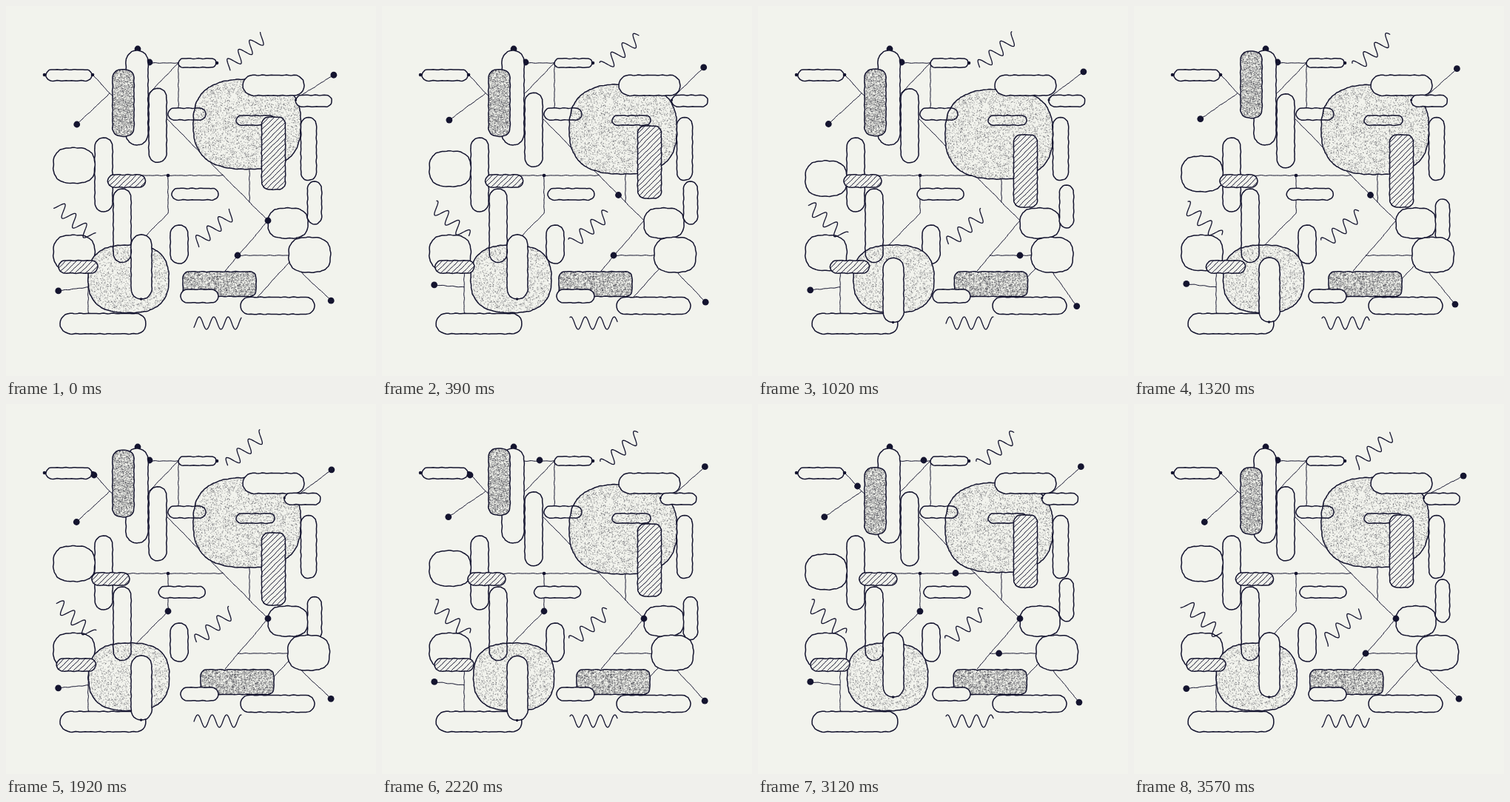
These frames come from a looping animation (500x500 px, 3.6 s). An HTML page with a canvas:

```html
<!DOCTYPE html>
<html lang="en">
<head>
<meta charset="utf-8">
<title>Moving shapes</title>
<style>
html, body { margin: 0; height: 100%; overflow: hidden; background: #f2f3ed; }
canvas { display: block; width: 500px; height: 500px; }
</style>
</head>
<body>
<canvas id="stage" width="500" height="500"></canvas>
<script>
const g = document.getElementById('stage').getContext('2d');
const ink = '#14142f', paper = '#f2f3ed', speck = '#1c1c28';
const { sin, cos, sign, abs, min, max, hypot, PI } = Math;
const TAU = 2 * PI;
let s = -1; // current step, 48 per loop

// ---- motion ----
function ease(u, back) {
  u = min(1, max(0, u));
  const f = v => v * v * ((back + 1) * v - back) / 2;
  return u < .5 ? f(2 * u) : 1 - f(2 - 2 * u);
}
// goes from 0 to 1 starting at step a, returns starting at step b
const slide = (a, b, d = 8, back = 2.6) => ease((s - a) / d, back) - ease((s - b) / d, back);
const glide = (a, b, d = 8) => slide(a, b, d, 0);
const swing = (shift = 0) => cos(TAU * (s - shift) / 12);
function bump(peak) {
  const t = s % 24;
  return (1 - cos(PI * (t < peak ? t / peak : (24 - t) / (24 - peak)))) / 2;
}

// ---- drawing ----
function rough(pts, closed) {
  const path = new Path2D();
  pts.forEach(([x, y], i) => {
    const [X, Y] = pts[i + 1] || (closed ? pts[0] : pts[i]);
    const n = max(1, Math.round(hypot(X - x, Y - y) / 2.5));
    for (let k = 0; k < n; k++) {
      const a = x + (X - x) * k / n, b = y + (Y - y) * k / n;
      path.lineTo(
        a + .25 * sin(.9 * a + .61 * b) + .2 * sin(.37 * b - .23 * a),
        b + .25 * sin(.57 * a - .8 * b + 2) + .2 * sin(.41 * a + .29 * b));
    }
  });
  if (closed) path.closePath();
  return path;
}

function line(...pts) {
  g.lineWidth = 1;
  g.stroke(rough(pts));
}

function dot(x, y, r = 4.4) {
  g.beginPath();
  g.arc(x, y, r, 0, TAU);
  g.fillStyle = ink;
  g.fill();
}

function roundedPoints(w, h, r) {
  const pts = [];
  for (let k = 0; k < 4; k++)
    for (let j = 0; j < 7; j++) {
      const a = (k * 6 + j) * PI / 12;
      pts.push([(k % 3 ? r : w - r) + r * cos(a), (k < 2 ? h - r : r) + r * sin(a)]);
    }
  return pts;
}

function blobPoints(w, h, n) {
  const bend = v => sign(v) * abs(v) ** (2 / n);
  return Array.from({ length: 72 }, (_, i) => {
    const a = i * TAU / 72;
    return [w / 2 * (1 + bend(cos(a))), h / 2 * (1 + bend(sin(a)))];
  });
}

// random specks, thinning out to the left of the share "from"
function grain(w, h, density, from) {
  let seed = Math.round(w * 3100 + h * 17);
  const rnd = () => (seed = seed * 16807 % 2147483647) / 2147483647;
  g.fillStyle = speck;
  for (let i = w * h * density; i > 0; i--) {
    const x = rnd(), y = rnd();
    g.globalAlpha = .2 + .35 * rnd();
    if (!from || x > from + (1 - from) * rnd()) g.fillRect(x * w, y * h, 1, 1);
  }
  g.globalAlpha = 1;
}

function hatch(w, h) {
  g.lineWidth = 1;
  for (let c = 3; c < w + h; c += 7.2) line([c, 0], [c - h, h]);
}

function shape(x, y, w, h, o = {}) {
  const path = rough(o.n ? blobPoints(w, h, o.n) : roundedPoints(w, h, o.r || min(w, h) / 2), true);
  g.save();
  g.translate(x, y);
  if (!o.open) {
    g.fillStyle = paper;
    g.fill(path);
  }
  g.save();
  g.clip(path);
  if (o.grain) grain(w, h, o.grain, o.from);
  if (o.hatch) hatch(w, h);
  g.restore();
  g.lineWidth = 1.5;
  g.stroke(path);
  g.restore();
}

function wave(x, y, angle) {
  const crest = 4.2 * swing(9.8) - 26.5;
  g.save();
  g.translate(x, y);
  g.rotate(angle * PI / 180);
  g.lineWidth = 1.3;
  g.beginPath();
  for (let i = -32; i <= 32; i++) g.lineTo(i, -8.5 * cos(TAU * (i - crest) / 19.5));
  g.stroke();
  g.restore();
}

// a dot on an arm around a pivot
function arm(x, y, length, angle) {
  const a = angle * PI / 180;
  const X = x + length * cos(a), Y = y + length * sin(a);
  line([x, y], [X, Y]);
  dot(X, Y);
}

function drawLines() {
  line([117, 93], [150, 128]);
  line([192, 77], [233, 77], [233, 138]);
  line([233, 77], [190, 121]);
  line([218, 153], [354, 290], [296, 358]);
  line([329, 200], [329, 265]);
  line([140, 229], [293, 229]);
  line([219, 229], [219, 280], [166, 334]);
  line([313, 337], [390, 337]);
  line([396, 332], [340, 393]);
  line([111, 350], [111, 415]);
  arm(140, 118, 61, 180 - 38.7 - 4.8 * swing());
  arm(392, 125, 60, -35 + 9.8 * swing(9.6));
  arm(111, 380, 40.5, 180 - 7 * swing(-.3));
  arm(396, 357, 59.7, 43.6 + 11 * bump(12));
}

function drawDots() {
  [[52, 93], [117, 93], [285, 77], [219, 229]].forEach(p => dot(...p, 2.3));
  dot(178, 58);
  dot(194 + 38 * glide(25, 38), 76);
  const b = glide(16, 37);
  dot(150 - 31 * b, 126 - 30 * b);
  const c = glide(0, 13);
  dot(354 - 69 * c, 290 - 69 * c);
  dot(313 + 82 * glide(9, 35.7), 337);
  const e = glide(16, 40.5);
  dot(166 + 53 * e, 334 - 54 * e);
  dot(132 + 135 * glide(34, 41, 6), 228.5);
}

function drawUpper() {
  shape(162, 60, 30, 128);
  shape(144, 86 - 23.5 * slide(10, 27), 29, 90, { r: 11, grain: .8 });
  shape(193, 115.3 - 4 * swing(), 24, 100);
  shape(120, 178, 24, 100);
  shape(64, 191.5 + 18 * bump(12), 56, 48, { n: 2.8 });
  shape(137.5 - 21.5 * slide(2, 36), 228, 51, 17, { hatch: true });
  shape(224 - 17.7 * slide(9, 28.2), 246.5, 63, 15.5);

  shape(253, 99 + 16 * bump(9), 145.5, 121.5, { n: 2.6, grain: .24 });
  shape(219, 138, 51, 16, { open: true });
  shape(311, 148, 52, 13, { open: true });
  shape(320, 93.5, 83, 27.5);
  const tag = 391.5 - 15.3 * slide(11, 37);
  shape(tag, 120.5, 49, 15.5);
  dot(tag, 127, 1.6);
  shape(345.5, 150 + 24 * slide(0, 25), 32, 98, { r: 10, hatch: true });
  shape(398.5, 150.5, 21, 85);
  shape(407.5, 237 + 23.5 * slide(9.5, 34), 19, 58);
}

function drawLower(flash) {
  shape(64, 309.5, 56, 48, { n: 2.8 });
  shape(222, 296, 24, 52);
  shape(73, 415.5, 116, 27.5, { grain: flash(9), from: .74 });
  shape(111 + 21.5 * bump(9), 323, 109, 91.5, { n: 2.6, grain: .22 });
  shape(145, 247, 24, 99.5, { open: true });
  const y = 309 + 31 * slide(5.5, 28.5);
  shape(169, y, 28, 87);
  dot(182.5, y + 87, 1.7);
  shape(71 + 26.5 * slide(1, 19), 344, 53, 17, { hatch: true });

  shape(382 - 19 * bump(6), 312.5, 56.5, 47.5, { n: 2.8 });
  shape(239 + 24 * slide(7, 40), 359, 99, 33.5, { r: 8, grain: .75 });
  shape(236, 383, 51, 18);
  shape(317, 393.5, 100, 23);
}

function draw() {
  g.fillStyle = paper;
  g.fillRect(0, 0, 500, 500);
  g.strokeStyle = ink;
  g.lineCap = g.lineJoin = 'round';
  const flash = at => .6 * max(0, 1 - abs(s - at) / 3);

  drawLines();
  // these lie below the travelling dots
  shape(54, 86, 62, 15);
  shape(233, 71, 51, 12, { grain: flash(33), from: .4 });
  shape(354, 273, 54, 41, { n: 2.8 });
  drawDots();
  drawUpper();
  drawLower(flash);
  wave(323.7, 61.8, -40);
  wave(92.4, 290.5, 42);
  wave(281.5, 300.5, -40);
  wave(286, 428.5, 0);
}

function frame(now) {
  const tick = Math.floor(now % 3600 / 30);
  const step = max(0, Math.ceil(.4 * tick - .2) - 1);
  if (step !== s) {
    s = step;
    draw();
  }
  requestAnimationFrame(frame);
}
requestAnimationFrame(frame);
</script>
</body>
</html>
```
